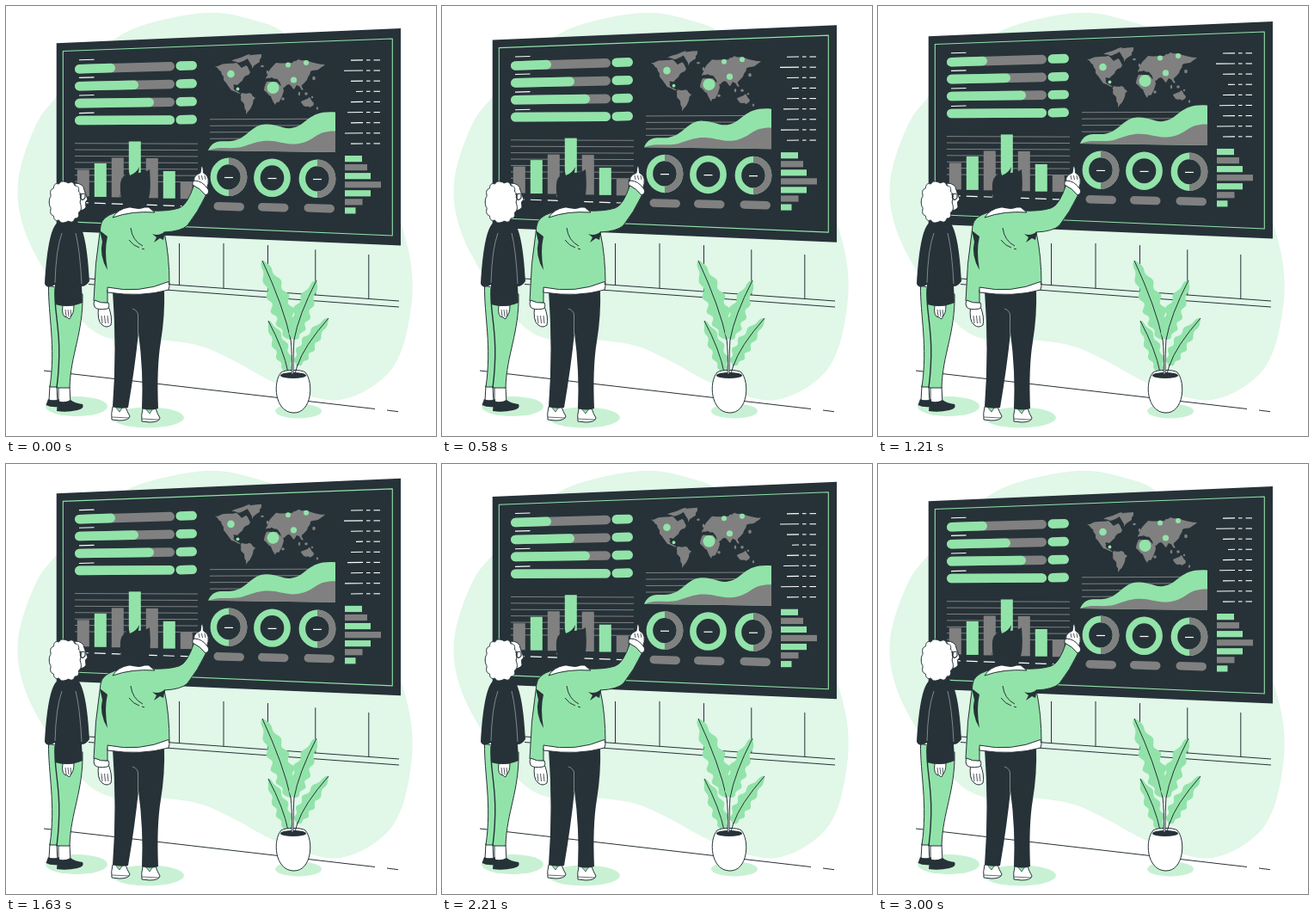
Recreate the animation shown at these times as an HTML page with a canvas. Size 500x500 px, loop 3040 ms.

```html
<!DOCTYPE html>
<html lang="en">
<head>
<meta charset="utf-8">
<title>Dashboard</title>
<style>
html, body { margin: 0; width: 100%; height: 100%; overflow: hidden; background: #fff; }
canvas { display: block; width: 500px; height: 500px; }
</style>
</head>
<body>
<canvas id="stage"></canvas>
<script>
const canvas = document.getElementById('stage');
const ctx = canvas.getContext('2d');
const scale = window.devicePixelRatio || 1;
canvas.width = canvas.height = 500 * scale;

const DARK = '#263238', GREEN = '#92e3a9', GREY = '#808080', WHITE = '#fff';
const PALE = '#e1f7e8', SHADE = '#c8f1d4', SEAM = '#a8adb0';
const LOOP = 3040, CYCLE = 3000, LIFT = 10, TAU = Math.PI * 2;

function paint(path, fill, stroke, width = 1) {
  if (fill) { ctx.fillStyle = fill; ctx.fill(path); }
  if (stroke) { ctx.strokeStyle = stroke; ctx.lineWidth = width; ctx.stroke(path); }
}

const shape = (d, fill, stroke, width) => paint(new Path2D(d), fill, stroke, width);

function line(x1, y1, x2, y2, color = DARK, width = 1, cap = 'butt') {
  ctx.lineCap = cap;
  shape(`M${x1} ${y1}L${x2} ${y2}`, null, color, width);
  ctx.lineCap = 'butt';
}

function oval(x, y, rx, ry, fill) {
  const p = new Path2D();
  p.ellipse(x, y, rx, ry, 0, 0, TAU);
  paint(p, fill);
}

function bar(x, y, w, h, color) {
  ctx.fillStyle = color;
  ctx.fillRect(x, y, w, h);
}

function pill(x1, y1, x2, y2, h, color) {
  line(x1 + h / 2, y1, x2 - h / 2, y2, color, h, 'round');
}

function ring(x, y, color, from = 0, to = 2) {
  const p = new Path2D();
  p.ellipse(x, y, 17.6, 18.4, 0, from * Math.PI, to * Math.PI);
  paint(p, null, color, 7.6);
}

const pairs = (text) => text.split(',').map((s) => s.trim().split(' ').map(Number));

// Closed smooth curve through a few points.
function smooth(points) {
  const n = points.length, path = new Path2D();
  const at = (i) => points[(i + n) % n];
  path.moveTo(...points[0]);
  for (let i = 0; i < n; i++) {
    const [a, b, c, d] = [at(i - 1), at(i), at(i + 1), at(i + 2)];
    path.bezierCurveTo(b[0] + (c[0] - a[0]) / 6, b[1] + (c[1] - a[1]) / 6,
      c[0] - (d[0] - b[0]) / 6, c[1] - (d[1] - b[1]) / 6, ...c);
  }
  return path;
}

let seed = 7;
function random() {
  seed = (seed * 16807) % 2147483647;
  return seed / 2147483647;
}

// Closed outline with a ragged coast between its key points.
function coast(points) {
  const path = new Path2D();
  points.forEach(([x, y], i) => {
    const [u, v] = points[(i + 1) % points.length];
    path.lineTo(x, y);
    for (const s of [0.3, 0.65]) {
      path.lineTo(x + (u - x) * s + random() * 2 - 1, y + (v - y) * s + random() * 2 - 1);
    }
  });
  path.closePath();
  return path;
}

// Rounded outline made of small bumps.
function puff(x, y, rx, ry, bumps) {
  const path = new Path2D();
  const flat = (v) => Math.sign(v) * Math.pow(Math.abs(v), 0.8);
  for (let i = 0; i < 120; i++) {
    const a = i / 120 * TAU;
    const k = 0.94 + 0.09 * Math.abs(Math.sin(a * bumps / 2));
    path.lineTo(x + rx * k * flat(Math.cos(a)), y + ry * k * flat(Math.sin(a)));
  }
  path.closePath();
  return path;
}

// Wavy leaf along a curved axis from base (a) through (c) to tip (b).
function leaf(ax, ay, cx, cy, bx, by, half, lobes) {
  const path = new Path2D();
  const edge = (s, side) => {
    const r = 1 - s;
    const x = r * r * ax + 2 * r * s * cx + s * s * bx;
    const y = r * r * ay + 2 * r * s * cy + s * s * by;
    const tx = r * (cx - ax) + s * (bx - cx), ty = r * (cy - ay) + s * (by - cy);
    const body = Math.pow(Math.sin(Math.PI * Math.pow(s, 0.85)), 0.55);
    const wave = 0.86 + 0.19 * Math.sin(TAU * lobes * s + side);
    const w = side * half * body * wave / Math.hypot(tx, ty);
    path.lineTo(x - ty * w, y + tx * w);
  };
  for (let i = 0; i <= 60; i++) edge(i / 60, 1);
  for (let i = 60; i >= 0; i--) edge(i / 60, -1);
  paint(path, GREEN);
  shape(`M${ax} ${ay}Q${cx} ${cy} ${bx} ${by}`, null, DARK);
}

const backdrop = smooth(pairs('232 8, 290 17, 328 36, 385 105, 430 185, 464 268, 472 340, 450 420, 388 458,' +
  '318 440, 266 413, 228 396, 187 389, 140 390, 98 375, 53 320, 22 262, 14 205, 34 140, 62 102, 105 56, 152 25'));

const lands = [
  '243 70, 257 67, 268 66, 274 72, 279 69, 284 77, 276 84, 270 91, 264 92, 266 98, 273 102, 262 98, 253 86, 250 76',
  '262 64, 273 60, 284 56, 278 63, 270 66',
  '280 58, 297 56, 295 65, 286 73, 283 65',
  '274 101, 283 101, 290 107, 285 118, 279 126, 277 114, 273 107',
  '302 85, 305 77, 314 66, 333 66, 340 62, 354 65, 371 68, 363 74, 354 76, 350 86, 344 92, 345 98,' +
    '338 92, 335 97, 329 91, 321 96, 317 87, 309 83',
  '303 88, 315 88, 323 97, 319 109, 313 115, 308 105, 300 98',
  '343 111, 353 106, 358 113, 354 118, 346 116'
].map((s) => coast(pairs(s)));
const islands = pairs('341 102, 349 102, 356 106, 358 84, 362 119, 298 70, 304 77, 322 108');

function drawRoom() {
  paint(backdrop, PALE);
  oval(82, 465.5, 36, 11.5, SHADE);
  oval(165, 478.5, 42, 12, SHADE);
  oval(340, 471, 27, 8.5, SHADE);
  line(44, 424, 429, 468.5);
  line(443, 470, 456, 471.7);
  line(96, 317, 457, 343);
  line(96, 323.5, 457, 350);
  for (const x of [201.5, 253, 304.5, 359.8, 421.8]) {
    line(x, Math.max(276, 268.5 + (x - 201) * 0.093), x, 325 + (x - 201) * 0.07);
  }
}

function drawProgress() {
  [127, 154, 172, 196].forEach((end, i) => {
    const left = 73.3 + 19.9 * i, right = 70.2 + 20.75 * i;
    pill(80, left, 196, right, 10.6, GREY);
    pill(80, left, end, left + (right - left) * (end - 80) / 116, 10.6, GREEN);
    pill(197.5, 69.6 + 20.9 * i, 222, 69.2 + 20.9 * i, 10.6, GREEN);
    line(85, 62.8 + 20.6 * i, 102.5, 62.3 + 20.6 * i, WHITE, 1.1);
  });
}

function drawColumns() {
  for (let i = 0; i < 7; i++) line(80, 159.7 + 7.4 * i, 223, 160.2 + 7.4 * i, GREY);
  [190.5, 183, 176.5, 157.5, 177, 192, 205].forEach((top, i) => {
    const x = 82.8 + 20 * i;
    bar(x, top, 14, 221.5 + 0.45 * i - top, i % 2 ? GREEN : GREY);
    line(x, 228.4 + 0.7 * i, x + 13, 228.9 + 0.7 * i, WHITE, 1.2);
  });
}

function drawMap() {
  lands.forEach((p) => paint(p, GREY));
  islands.forEach(([x, y], i) => oval(x, y, 1.2 + i % 2 * 0.6, 2.2 - i % 3 * 0.5, GREY));
  pairs('261.5 79 4.3, 269.5 96.5 1.9, 310.5 95 7, 328 68.5 3, 349 66 3, 334.5 86 3.6')
    .forEach(([x, y, r]) => oval(x, y, r, r, GREEN));
}

function drawArea() {
  for (let i = 0; i < 4; i++) line(237, 131.8 + 7.5 * i, 383, 131.2 + 7.5 * i, GREY);
  shape('M235 168C241 154 251 158 262 157C281 155 285 137 303 137.5S322 145 336 141S353 121 383 123.5V170Z', GREEN);
  shape('M235 168C251 162 262 168 277 163S297 156 309 157S330 163 345 159S361 145 383 145.5V170Z', GREY);
}

function drawRings() {
  [259, 309.5, 362].forEach((x, i) => {
    const y = 198.8 + i;
    ring(x, y, GREEN);
    if (i !== 1) ring(x, y, GREY, -0.5, 0.5);
    line(x - 5, y + 0.7, x + 5, y + 0.7, WHITE, 1.2);
    pill(x - 17.5 + i, y + 34, x + 18 + i, y + 34.8, 9.6, GREY);
  });
}

function drawLists() {
  [401, 393, 401, 407, 401, 397, 401, 394, 401].forEach((x, i) => {
    const y = 62.9 + 12.13 * i;
    line(x, y + 0.2, 415, y, WHITE, 1.1);
    line(419, y, 423.5, y, WHITE, 1.1);
    line(427.5, y, 435, y, WHITE, 1.1);
  });
  [20, 26, 30, 42, 30, 20.5, 12.5].forEach((w, i) => bar(394, 174 + 10.05 * i, w, 7.2, i % 2 ? GREY : GREEN));
}

function drawBoard(dy) {
  ctx.save();
  ctx.translate(0, dy);
  shape('M58.7 43.3L459 26V278.5L58.7 261.5Z', DARK);
  shape('M66.3 52.5L449.3 38V267L66.3 250.6Z', null, GREEN, 1.1);
  drawProgress();
  drawColumns();
  drawMap();
  drawArea();
  drawRings();
  drawLists();
  ctx.restore();
}

function drawPlant() {
  leaf(331, 388, 323, 350, 298, 296, 13, 5.5);
  leaf(335, 388, 340, 360, 361, 319, 11, 4.5);
  leaf(328, 426, 323, 400, 305, 366, 9, 4);
  leaf(339, 418, 346, 396, 375, 363, 9.5, 4.5);
  shape('M320 426C310 437 312 472 334 473S358 437 348 426C344 422.5 324 422.5 320 426Z', WHITE, DARK);
  oval(334, 429.5, 15, 3.6, DARK);
  shape('M331 387Q333 402 332 428H334Q334 402 335 387', WHITE, DARK);
  line(339, 417, 336, 428);
}

// Strokes of the fingers across a hand.
function fingers(x, y, step, h) {
  for (let i = 0; i < 3; i++) line(x + step * i, y, x + step * i + 1, y + h, DARK, 0.8);
}

function drawWoman() {
  shape('M51 441H61V459H50ZM59 443H74L75 462H60Z', WHITE, DARK);
  shape('M49 457Q55 460 62 457V466Q52 467 46.5 464Z', DARK);
  shape('M60 459Q68 462 75 458Q80 462 89 463Q92 468 83 470Q70 473 59 471Z', DARK);
  shape('M49.5 325C49 360 58 395 51 443H60L59 444H74C75 405 90 380 89 335Z', GREEN, DARK);
  shape('M57 328C55 360 67 380 59 444', null, DARK, 1.4);
  shape('M66 348Q64 362 71 362Q75 366 75 361Q79 358 79 348Z', WHITE, DARK);
  fingers(69, 353, 3, 8);
  shape('M67 240L66 253Q76 256 80 250V240Z', WHITE, DARK);
  shape('M61 251Q70 249 80 248C91 254 95 285 97 320Q93 326 88 326L89 345Q73 352 57 347V324' +
    'Q48 330 45 323C47 290 51 256 61 251Z', DARK);
  shape('M65 264Q58 283 57 322M81 264Q86 284 88 323', null, SEAM, 0.7);
  shape('M80 206Q90 206 91 214L95 225 92.5 228 93 234Q90 239 82 237Z', WHITE, DARK);
  paint(puff(69, 228, 18.2, 23.5, 13), WHITE, DARK);
  shape('M85 219L92 218M87 219C85 224 89 228 92 223V219', null, DARK, 1.2);
}

function drawShoe(x, y) {
  ctx.save();
  ctx.translate(x, y);
  shape('M1 0H16Q18 6 21 11Q20 16 9 16L0 15Q-1 8 1 0Z', WHITE, DARK);
  shape('M4 0H13L9 6Z', GREEN, DARK, 0.7);
  line(0, 12, 20, 13, DARK, 0.7);
  ctx.restore();
}

function drawMan() {
  drawShoe(123, 466);
  drawShoe(158, 468);
  shape('M124 331Q129 400 124 466Q133 469 142 467Q150 420 154 380Q160 425 158 468Q168 471 177 468' +
    'Q175 420 180 390Q185 360 184 329Z', DARK);
  shape('M147 352Q153 354 153.5 359V382', null, SEAM, 0.7);
  shape('M108 348Q105 366 112 371Q117 375 122 371Q124 362 119 349Z', WHITE, DARK);
  fingers(111, 360, 3.5, 9);
  shape('M220 209Q215 198 226 194L227 187Q229 183 229.5 194Q239 198 233 214Z', WHITE, DARK);
  fingers(224, 197, 3.5, 5);
  // jacket
  shape('M128 240Q111 245 110 256Q103 300 102 343Q110 348 118 345V330Q155 338 190 324Q190 290 184 263' +
    'Q204 262 211 255Q223 240 233 219L219 207Q211 232 201 235Q188 239 167 238Z', GREEN, DARK);
  shape('M109 261L118 268Q114 285 118 307Q108 290 112 274Z', DARK);
  shape('M170 265Q178 268 185 262L183 272 179 270 172 275 175 269Z', DARK);
  shape('M145 258Q147 273 159 279M158 282L161 283M143 272Q148 279 155 281', null, DARK);
  shape('M118 327Q155 335 189 320.5Q191 326 189 330Q158 339 118 333Z', WHITE, DARK);
  shape('M103 342Q110 346 119 345Q121 350 118 352Q106 354 103 350Q101 346 103 342Z', WHITE, DARK);
  shape('M219 203Q228 203 235 213Q237 218 232 220Q226 212 217 208Q216 204 219 203Z', WHITE, DARK);
  // collar and head
  shape('M124 246Q130 236 143 234H166L173 240Q146 238 124 246Z', WHITE, DARK);
  shape('M135 219Q130 217 136 228Z', WHITE, DARK);
  shape('M134 225Q131 203 136 199Q141 195 142 189L144 197Q152 194 155 187L154 194Q163 193 167 190' +
    'Q169 214 166 223Q165 236 154 236Q141 236 134 225Z', DARK);
}

function draw(now) {
  const t = Math.min(now % LOOP, CYCLE) / CYCLE;
  ctx.setTransform(scale, 0, 0, scale, 0, 0);
  ctx.lineJoin = 'round';
  bar(0, 0, 500, 500, WHITE);
  drawRoom();
  drawBoard(-LIFT * (1 - Math.abs(1 - 2 * t)));
  drawPlant();
  drawWoman();
  drawMan();
}

const start = performance.now();
function tick() {
  draw(performance.now() - start);
  requestAnimationFrame(tick);
}
tick();
</script>
</body>
</html>
```
